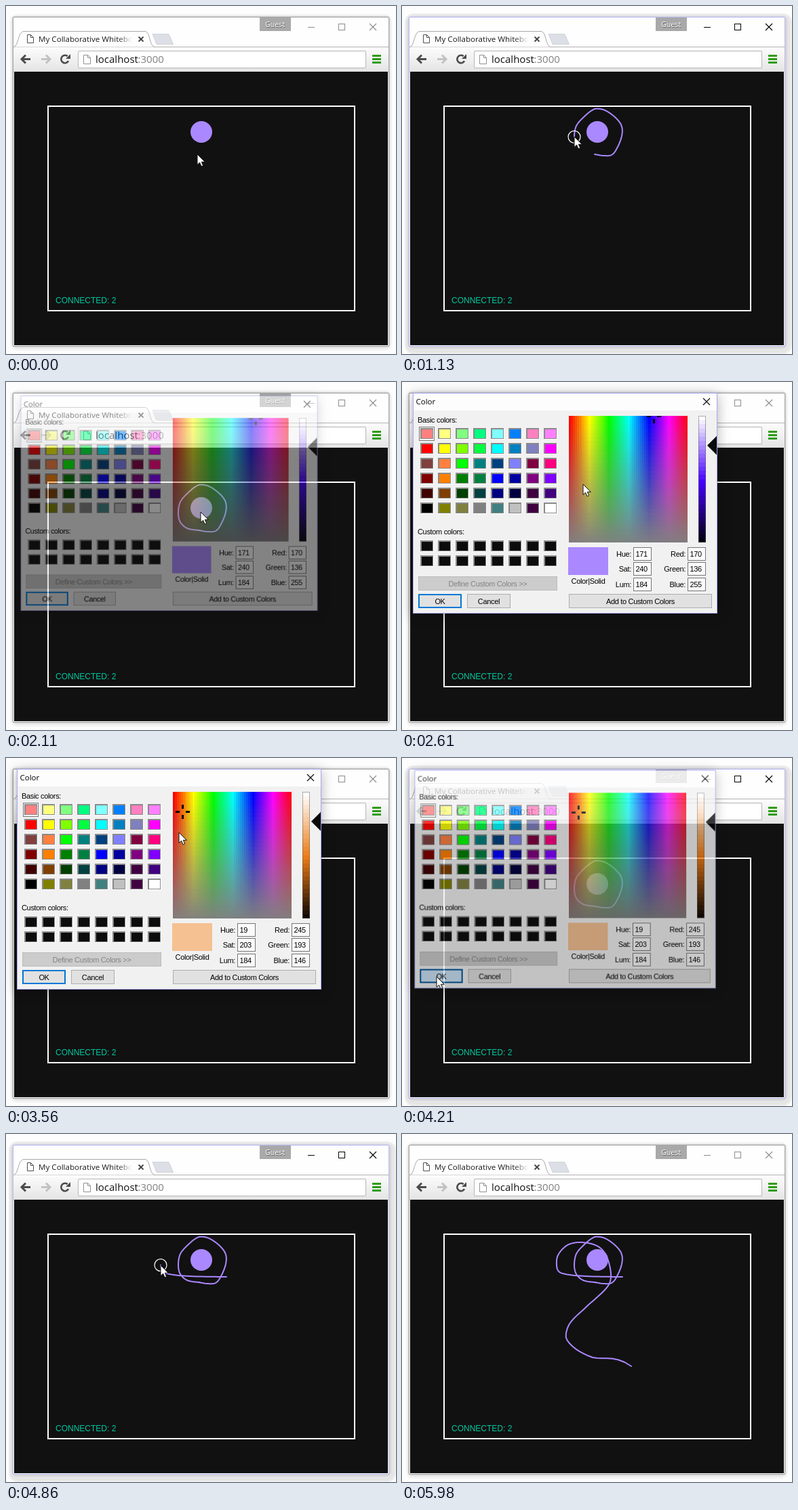
Animation, 575 px wide and 514 px high, one loop 6540 ms. Source, as an HTML page with a canvas:

```html
<!DOCTYPE html>
<html lang="en">
<head>
<meta charset="utf-8">
<title>Collaborative whiteboard</title>
<style>
  html, body { margin: 0; width: 575px; height: 514px; overflow: hidden; background: #fdfdfd; }
  canvas { display: block; }
</style>
</head>
<body>
<canvas id="stage" width="575" height="514"></canvas>
<script>
const W = 575, H = 514, LOOP = 6540;
const INK = '#aa88ff';
const UI = '"Open Sans", sans-serif';
const SANS = '"Liberation Sans", Arial, sans-serif';

const stage = document.getElementById('stage').getContext('2d');
const layer = (w, h) => Object.assign(document.createElement('canvas'), { width: w, height: h }).getContext('2d');
const panel = layer(W, H);
let g = stage;

// Pointer track: time, x, y
const track = [
  [310, 282, 219], [340, 284, 219], [440, 297, 221], [510, 309, 220], [590, 317, 210],
  [690, 324, 192], [760, 324, 178], [840, 316, 166], [910, 303, 156], [970, 292, 152],
  [1010, 282, 153], [1060, 268, 164], [1095, 257, 177], [1130, 254, 193], [1180, 257, 207],
  [1240, 267, 216], [1370, 286, 219], [1630, 286, 219],
  [1950, 286, 193], [2270, 281, 193], [2450, 234, 180], [2610, 267, 151], [2930, 258, 92],
  [3080, 260, 80], [3240, 260, 80], [3600, 247, 120], [4060, 51, 323], [4240, 51, 323],
  [4620, 325, 211], [4650, 325, 211], [4740, 270, 210], [4800, 241, 207], [4830, 231, 203],
  [4860, 228, 194], [4900, 230, 179], [4950, 244, 164], [4990, 263, 160], [5030, 285, 164],
  [5060, 297, 173], [5100, 305, 190], [5140, 308, 212], [5180, 301, 228], [5240, 270, 257],
  [5290, 246, 282], [5320, 243, 304], [5390, 278, 329], [5450, 338, 343], [5560, 494, 487]
];
const strokes = [[340, 1370], [4650, 5450]];
const OPEN = 2050, CLOSE = 4186, FADE = 120, PICK = 3100, LEAVE = 5980;

const clamp = v => Math.max(0, Math.min(1, v));
const same = (a, b) => a[1] === b[1] && a[2] === b[2];

function slope(i, k) {
  const a = track[i - 1], b = track[i], c = track[i + 1];
  if (!a || !c || same(a, b) || same(b, c)) return 0;
  return (c[k] - a[k]) / (c[0] - a[0]);
}

function pointer(t) {
  const last = track.length - 1;
  if (t <= track[0][0]) return track[0].slice(1);
  if (t >= track[last][0]) return track[last].slice(1);
  const i = track.findIndex(p => p[0] > t) - 1;
  const a = track[i], b = track[i + 1], d = b[0] - a[0], u = (t - a[0]) / d;
  return [1, 2].map(k => {
    const u2 = u * u, u3 = u2 * u;
    return a[k] * (2 * u3 - 3 * u2 + 1) + b[k] * (3 * u2 - 2 * u3)
      + d * (slope(i, k) * (u3 - 2 * u2 + u) + slope(i + 1, k) * (u3 - u2));
  });
}

function box(x, y, w, h, color) {
  g.fillStyle = color;
  g.fillRect(x, y, w, h);
}
function frame(x, y, w, h, color, line = 1) {
  g.strokeStyle = color;
  g.lineWidth = line;
  g.strokeRect(x + line / 2, y + line / 2, w - line, h - line);
}
function round(x, y, w, h, r, color) {
  g.fillStyle = color;
  g.beginPath();
  g.roundRect(x, y, w, h, r);
  g.fill();
}
function poly(pts, { fill, stroke, line = 1, closed = true }) {
  g.beginPath();
  pts.forEach(p => g.lineTo(p[0], p[1]));
  if (closed) g.closePath();
  if (fill) { g.fillStyle = fill; g.fill(); }
  if (stroke) { g.strokeStyle = stroke; g.lineWidth = line; g.stroke(); }
}
function text(s, x, y, font, color, align = 'left', spacing = 0) {
  g.font = font;
  g.fillStyle = color;
  g.textAlign = align;
  g.letterSpacing = spacing + 'px';
  g.fillText(s, x, y);
}
function cross(x, y, size, color, line) {
  poly([[x, y], [x + size, y + size]], { stroke: color, line, closed: false });
  poly([[x + size, y], [x, y + size]], { stroke: color, line, closed: false });
}
function pageIcon(x, y, w, h, color) {
  const f = 4;
  poly([[x, y], [x + w - f, y], [x + w, y + f], [x + w, y + h], [x, y + h]], { fill: '#fff', stroke: color });
  poly([[x + w - f, y], [x + w - f, y + f], [x + w, y + f]], { stroke: color, closed: false });
}
function arrow(x, y, dir, color) {
  poly([[x, y], [x + 14 * dir, y]], { stroke: color, line: 3, closed: false });
  poly([[x + 7 * dir, y - 6], [x + dir, y], [x + 7 * dir, y + 6]], { stroke: color, line: 3, closed: false });
}

function drawShadow(active) {
  box(0, 0, W, H, '#fdfdfd');
  if (active) {
    round(4, 11, 571, 503, 13, '#ededed');
    round(6, 13, 566, 499, 11, '#e5e5e5');
    round(8, 15, 560, 491, 8, '#d6d6d6');
  } else {
    round(6, 12, 563, 497, 10, '#f3f3f3');
    round(8, 14, 559, 492, 8, '#e8e8e8');
    round(9, 15, 557, 489, 5, '#d2d2d2');
  }
}

function drawBrowser(active) {
  drawShadow(active);
  box(10, 16, 555, 487, active ? '#b6b6f6' : '#a4a4a4');
  box(11, 17, 553, 485, '#fefefe');

  const btn = active ? '#000' : '#8c8c8c';
  box(445, 31, 10, 1, btn);
  frame(490, 26, 10, 10, btn);
  cross(536, 26, 10, btn, 1.1);

  box(374, 17, 46, 20, '#a9a9a9');
  text('Guest', 382.5, 32, '10.7px ' + UI, '#555');
  text('Guest', 382, 31, '10.7px ' + UI, '#fff');

  const bar = g.createLinearGradient(0, 60, 0, 97);
  bar.addColorStop(0, '#fdfdfd');
  bar.addColorStop(1, '#e4e4e4');
  box(11, 60, 553, 37, bar);
  box(11, 60, 553, 1, '#b4b4b4');

  g.beginPath();
  g.moveTo(12, 60.5);
  g.bezierCurveTo(18, 59, 18, 37.5, 26, 37.5);
  g.lineTo(205, 37.5);
  g.bezierCurveTo(213, 37.5, 211, 59, 219, 60.5);
  g.fillStyle = '#fdfdfd';
  g.fill();
  g.strokeStyle = '#a8a8a8';
  g.lineWidth = 1;
  g.stroke();
  poly([[216, 41.5], [240, 41.5], [246.5, 56.5], [222, 56.5]], { fill: '#dcdfe6', stroke: '#d0d2d8' });

  pageIcon(31.5, 42.5, 9, 12, '#505050');
  const fade = g.createLinearGradient(165, 0, 186, 0);
  fade.addColorStop(0, '#1c1c1c');
  fade.addColorStop(1, 'rgba(28,28,28,0)');
  text('My Collaborative Whiteboard', 48, 53, '11.6px ' + UI, fade);
  cross(195.5, 45.5, 7, '#444', 1.8);

  arrow(22, 78.5, 1, '#4c4c4c');
  arrow(66, 78.5, -1, '#c2c2c2');
  g.strokeStyle = '#4c4c4c';
  g.lineWidth = 2.6;
  g.beginPath();
  g.arc(87, 78.5, 5.7, 0.5, 5.4);
  g.stroke();
  poly([[95, 71], [95, 78], [88, 78]], { fill: '#4c4c4c' });

  round(106, 66, 425, 26, 2, '#b6b6b6');
  round(107, 67, 423, 24, 1, '#fff');
  pageIcon(114.5, 72.5, 10, 13, '#909090');
  text('localhost', 132, 84, '15px ' + UI, '#111');
  text(':3000', 194.5, 84, '15px ' + UI, '#808080');
  [72, 77, 82].forEach(y => box(540, y, 13, 3, '#2f9c14'));
}

function drawBoard(t) {
  box(12, 97, 551, 404, '#111');
  frame(61, 147, 454, 304, '#fff', 2);
  text('CONNECTED: 2', 73, 439, '12px ' + SANS, '#00caa2');
  g.lineJoin = g.lineCap = 'round';
  for (const [from, to] of strokes) {
    if (t <= from) continue;
    const end = Math.min(t, to), pts = [];
    for (let s = from; s < end; s += 8) pts.push(pointer(s));
    pts.push(pointer(end));
    poly(pts, { stroke: INK, line: 2, closed: false });
  }
  g.lineJoin = 'miter';
  g.lineCap = 'butt';
  g.fillStyle = INK;
  g.beginPath();
  g.arc(288, 186, 16, 0, 7);
  g.fill();
}

const hsl = (h, s, l) => `hsl(${h * 1.5} ${s / 2.4}% ${l / 2.4}%)`;

const spectrum = layer(175, 187);
for (let h = 0; h < 240; h += 4) {
  for (let s = 0; s < 240; s += 8) {
    const x = Math.round(h / 240 * 175), y = Math.round(s / 240 * 187);
    spectrum.fillStyle = hsl(h, 240 - s, 120);
    spectrum.fillRect(x, y, 4, 7);
  }
}

// One digit per channel: f is full, any other digit counts sixteenths
const basic = ('f88 ff8 8f8 0f8 8ff 08f f8c f8f f00 ff0 8f0 0f4 0ff 08c 88c f0f ' +
  '844 f84 0f0 088 048 88f 804 f08 800 f80 080 084 00f 00a 808 80f ' +
  '400 840 040 044 008 004 404 408 000 880 884 888 488 ccc 404 fff').split(' ')
  .map(c => '#' + [...c].map(d => d === 'f' ? 'ff' : d + '0').join(''));

const before = { hsl: [171, 240, 184], rgb: [170, 136, 255] };
const after = { hsl: [19, 203, 184], rgb: [245, 193, 146] };

const label = (s, x, y, align, color = '#000') => text(s, x, y, '11px ' + SANS, color, align, -0.33);

function swatch(col, row, top, color) {
  const x = 27 + col * 26, y = top + row * 22;
  box(x, y, 20, 17, '#fff');
  box(x, y, 19, 16, '#8a8a8a');
  box(x + 2, y + 2, 16, 13, color);
}
function button(s, x, y, w, h, face, edge, line, color) {
  box(x, y, w, h, face);
  frame(x, y, w, h, edge, line);
  label(s, x + w / 2, y + h / 2 + 4, 'center', color);
}
function field(name, value, x, y) {
  label(name, x - 3, y + 14, 'right');
  box(x, y, 27, 20, '#fafafa');
  frame(x, y, 27, 20, '#777');
  label(value, x + 3.5, y + 14, 'left');
}

function drawDialog(t) {
  const now = t < PICK ? before : after;
  const [hue, sat, lum] = now.hsl;
  g.clearRect(0, 0, W, H);
  g.shadowColor = 'rgba(0,0,0,.3)';
  g.shadowBlur = 18;
  g.shadowOffsetY = 3;
  box(16, 16, 449, 326, '#a5a5ee');
  g.shadowColor = 'transparent';
  box(17, 17, 447, 324, '#f1f1f1');
  box(17, 17, 447, 25, '#fdfdfd');
  text('Color', 20.5, 33, '11.5px ' + UI, '#000');
  cross(444, 24, 10, '#111', 1.2);

  label('Basic colors:', 23, 60);
  basic.forEach((c, i) => swatch(i % 8, i >> 3, 68, c));
  g.setLineDash([1, 1]);
  frame(25, 66, 23, 21, '#000');
  g.setLineDash([]);
  label('Custom colors:', 23, 225);
  for (let i = 0; i < 16; i++) swatch(i % 8, i >> 3, 234, '#0c0c0c');

  const hot = t > 4030;
  button('Define Custom Colors >>', 24, 287, 205, 21, '#cccccc', '#bcbcbc', 1, '#838383');
  button('OK', 24, 313, 64, 21, hot ? '#cce4f7' : '#e1e1e1', hot ? '#005499' : '#0078d7', 2);
  button('Cancel', 96, 313, 64, 21, '#e1e1e1', '#adadad', 1);
  button('Add to Custom Colors', 246, 313, 211, 21, '#e1e1e1', '#adadad', 1);

  g.drawImage(spectrum.canvas, 246, 50);
  g.save();
  g.beginPath();
  g.rect(246, 50, 175, 187);
  g.clip();
  g.translate(Math.round(246 + hue / 240 * 175), Math.round(50 + (240 - sat) / 240 * 187));
  box(-10, -1, 6, 3, '#000');
  box(5, -1, 6, 3, '#000');
  box(-1, -10, 3, 6, '#000');
  box(-1, 5, 3, 6, '#000');
  g.restore();

  for (let i = 0; i < 30; i++) {
    const y = Math.round(50 + i / 30 * 187);
    box(437, y, 11, Math.min(7, 237 - y), hsl(hue, sat, 240 - i * 8));
  }
  frame(437, 50, 11, 187, 'rgba(90,90,90,.5)');
  const tip = 50 + (240 - lum) / 240 * 187;
  poly([[450, tip], [464, tip - 14], [464, tip + 14]], { fill: '#0a0a0a' });

  box(245, 244, 59, 41, `rgb(${now.rgb})`);
  label('Color|Solid', 274.5, 298, 'center');
  const rows = [244, 266, 289];
  ['Hue:', 'Sat:', 'Lum:'].forEach((n, i) => field(n, now.hsl[i], 341, rows[i]));
  ['Red:', 'Green:', 'Blue:'].forEach((n, i) => field(n, now.rgb[i], 421, rows[i]));
}

function drawPointer(t) {
  const [x, y] = pointer(t);
  if (strokes.some(([a, b]) => t >= a && t <= b)) {
    g.strokeStyle = '#fff';
    g.lineWidth = 1.2;
    g.beginPath();
    g.arc(x, y, 9, 0, 7);
    g.stroke();
  }
  g.save();
  g.translate(Math.round(x), Math.round(y));
  poly([[0, 0], [0, 15.5], [3.6, 12.2], [6, 17.8], [8.6, 16.7], [6.3, 11.3], [11.3, 11.3]],
    { fill: '#fff', stroke: '#111' });
  g.restore();
}

function render(t) {
  const open = clamp(t < CLOSE ? (t - OPEN) / FADE : 1 - (t - CLOSE) / FADE);
  const active = t >= 310 && t < OPEN || t >= CLOSE && t < LEAVE;
  g = stage;
  drawBrowser(active);
  drawBoard(t);
  if (open > 0) {
    g = panel;
    drawDialog(t);
    g = stage;
    const k = 0.95 + 0.05 * open;
    g.save();
    g.globalAlpha = open;
    g.translate(240.5, 179);
    g.scale(k, k);
    g.drawImage(panel.canvas, -240.5, -179);
    g.restore();
  }
  if (t < LEAVE) drawPointer(t);
}

const start = performance.now();
function tick() {
  render((performance.now() - start) % LOOP);
  requestAnimationFrame(tick);
}
tick();
</script>
</body>
</html>
```
